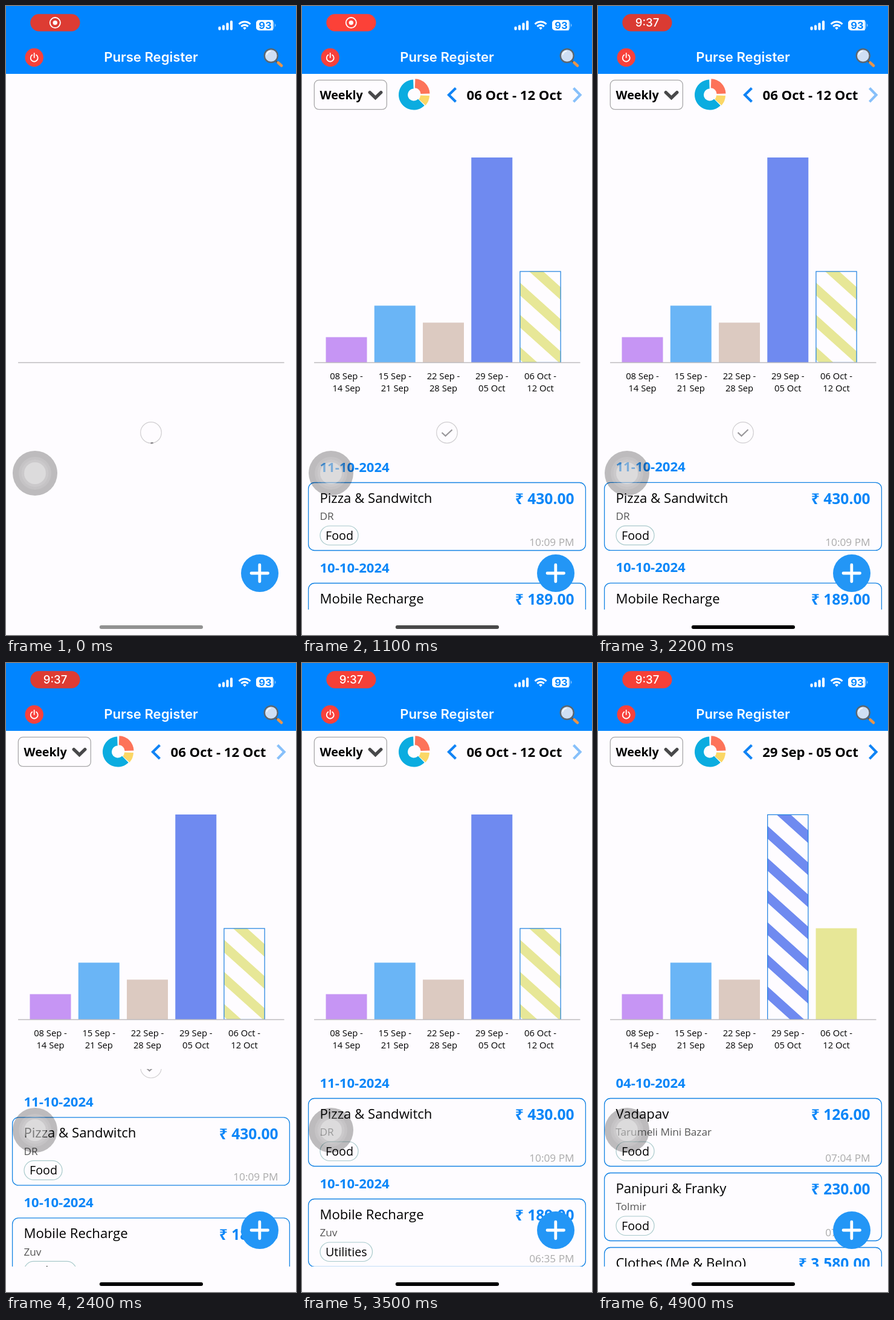
These frames come from a looping animation (480x1038 px, 5 s). An HTML page:

```html
<!DOCTYPE html>
<html lang="en">
<head>
<meta charset="utf-8">
<title>Expenses</title>
<style>
html, body { margin: 0; width: 100%; height: 100%; overflow: hidden; background: #fefcff; }
svg { display: block; width: 100%; height: 100%; }
text { font-family: "Open Sans", "Noto Sans", sans-serif; white-space: pre; }
.ui { font-family: Inter, Roboto, sans-serif; }
.bold { font-weight: 700; font-size: 22.15px; }
.date { fill: #0a86f8; }
.title { font-size: 22.15px; }
.sum { font-weight: 700; font-size: 24.6px; fill: #0a86f8; text-anchor: end; }
.note { font-size: 17.2px; fill: #555; }
.time { font-size: 17.2px; fill: #aaa; text-anchor: end; }
.tag { font-size: 19.7px; }
.label { font-size: 14.77px; text-anchor: middle; }
.line { fill: none; stroke-linecap: round; stroke-linejoin: round; }
.mid { text-anchor: middle; }
</style>
</head>
<body>
<svg viewBox="0 0 480 1038" preserveAspectRatio="none">
  <defs>
    <clipPath id="listClip"><path d="M0 670H480V996H0z"/></clipPath>
  </defs>
  <rect width="480" height="1038" fill="#fefcff"/>

  <!-- header -->
  <rect width="480" height="112" fill="#0185ff"/>
  <rect id="pill" x="40.3" y="13.2" width="82.2" height="28.6" rx="14.3"/>
  <g id="rec">
    <circle cx="81.3" cy="27.6" r="8.6" fill="none" stroke="#fff" stroke-width="1.8"/>
    <circle cx="81.3" cy="27.6" r="3.7" fill="#fff"/>
  </g>
  <text id="clock" class="ui mid" x="81.5" y="34.2" font-size="18.6" font-weight="500" fill="#fff">9:37</text>
  <path d="M353.5 38v-2.2M360 38v-4.6M366.5 38v-8.4M373 38v-12" stroke="#fff" stroke-width="4.2" stroke-linecap="round"/>
  <g class="line" stroke="#fff" stroke-width="3.1" style="stroke-linecap:butt">
    <path d="M385.6 30a13 13 0 0 1 18.8 0M389.3 33.8a8 8 0 0 1 11.4 0"/>
    <path d="M392.2 36.2a4 4 0 0 1 5.6 0L395 39.2z" fill="#fff" stroke="none"/>
  </g>
  <rect x="414" y="23.3" width="29.5" height="17" rx="5" fill="#8cc8ff"/>
  <path d="M419 23.3H441.5V40.3H419a5 5 0 0 1-5-5v-7a5 5 0 0 1 5-5z" fill="#fff"/>
  <path d="M445 29q3 2.8 0 5.6z" fill="#8cc8ff"/>
  <text class="ui mid" x="429" y="37.6" font-size="16.5" font-weight="700" fill="#0185ff">93</text>

  <circle cx="46.7" cy="85" r="15.2" fill="#f8413b"/>
  <path class="line" d="M43.3 80.8a6 6 0 1 0 6.8 0M46.7 78v7" stroke="#fff" stroke-width="1.8"/>
  <text class="ui mid" x="240" y="92.4" font-size="22.1" font-weight="600" fill="#fff">Purse Register</text>
  <path d="M446 90l5 5" stroke="#4c5963" stroke-width="3"/>
  <path class="line" d="M450.5 93.5l5.5 5" stroke="#e8954a" stroke-width="4.6"/>
  <circle cx="438.7" cy="82" r="11" fill="#cfdff4" stroke="#5b6670" stroke-width="2.4"/>
  <path class="line" d="M431.5 80a8 8 0 0 1 6-5.5" stroke="#f3f8ff" stroke-width="2"/>

  <!-- chart and list -->
  <g id="content">
    <rect x="20.3" y="122.4" width="120" height="48.3" rx="7.5" fill="none" stroke="#a9a8aa" stroke-width="1.3"/>
    <text x="29.5" y="154" font-size="19.7" font-weight="700">Weekly</text>
    <path d="M112.3 142.6l9.2 8.8 9.2-8.8" fill="none" stroke="#48484a" stroke-width="5.4" stroke-linecap="round"/>
    <g id="pie"></g>
    <g class="line" stroke="#1083f5" stroke-width="4.2" style="stroke-linecap:butt;stroke-linejoin:miter">
      <path d="M254.5 135.5l-11.5 11.3 11.5 11.3"/>
      <path id="next" d="M449.5 135.5l11 11.3-11 11.3"/>
    </g>
    <text id="range" class="bold mid" x="351.5" y="154.6"></text>
    <g id="week0"></g>
    <g id="week1"></g>
  </g>
  <path d="M20 588.5H460.5" stroke="#bdbbbe" stroke-width="1.4"/>

  <!-- refresh indicator -->
  <g clip-path="url(#listClip)">
    <g id="refresh">
      <circle cx="240" cy="704" r="17.3" fill="none" stroke="#d0ced1" stroke-width="1.2"/>
      <path id="arc" d="M238 686.9q2-.4 4 0" fill="none" stroke="#858387" stroke-width="2.4"/>
      <path id="check" d="M231.5 704l6 5.6 11-10.4" fill="none" stroke="#98969a" stroke-width="2.2"/>
    </g>
  </g>

  <circle cx="420" cy="936" r="31" fill="#2396f6"/>
  <path class="line" d="M406 936h27.5M419.8 922.2v27.6" stroke="#fff" stroke-width="4.8"/>
  <rect id="home" x="154.8" y="1022" width="171.2" height="6" rx="3"/>
  <circle cx="48" cy="771" r="37" fill="#000" fill-opacity=".26"/>
  <g fill="#fff">
    <circle cx="48" cy="771" r="27" fill-opacity=".12"/>
    <circle cx="48" cy="771" r="22.5" fill-opacity=".1"/>
    <circle cx="48" cy="771" r="18" fill-opacity=".32"/>
  </g>
</svg>
<script>
const $ = id => document.getElementById(id);

const bars = [
  ["08 Sep", "14 Sep", 546.5, "#c695f4"],
  ["15 Sep", "21 Sep", 494.5, "#6ab5f6"],
  ["22 Sep", "28 Sep", 522.5, "#dccac1"],
  ["29 Sep", "05 Oct", 250, "#6f8af0"],
  ["06 Oct", "12 Oct", 437.7, "#e7e797"]
];

// string entries are day headings, arrays are cards
const weeks = [
  { bar: 4, list: ["11-10-2024", ["Pizza & Sandwitch", "DR", "Food", "430.00", "10:09 PM"],
                   "10-10-2024", ["Mobile Recharge", "Zuv", "Utilities", "189.00", "06:35 PM"]] },
  { bar: 3, list: ["04-10-2024", ["Vadapav", "Tarumeli Mini Bazar", "Food", "126.00", "07:04 PM"],
                   ["Panipuri & Franky", "Tolmir", "Food", "230.00", "07:01 PM"],
                   ["Clothes (Me & Belno)", "Shop", "Shopping", "3,580.00", "05:20 PM"]] }
];
const tagWidth = { Food: 63, Utilities: 86.5, Shopping: 107 };

const text = (cls, x, y, s) =>
  `<text class="${cls}" x="${x}" y="${y}">${s.replace("&", "&amp;")}</text>`;

function stripes(x, top, color) {
  const height = 588 - top;
  let d = "";
  for (let y = -34.5; y < height; y += 53) d += `M0 ${y}l68 61v21l-68-61z`;
  return `<svg x="${x}" y="${top}" width="68" height="${height}"><path d="${d}" fill="${color}"/></svg>
    <rect x="${x + .4}" y="${top + .4}" width="67.2" height="${height}" fill="none" stroke="#1a7fe0" stroke-width="1.2"/>`;
}

function chart(selected) {
  return bars.map(([from, to, top, color], i) => {
    const x = 39.5 + i * 80.25, mid = x + 34;
    const shape = i === selected ? stripes(x, top, color)
      : `<rect x="${x}" y="${top}" width="68" height="${588 - top}" fill="${color}"/>`;
    return shape + text("label", mid, 616, from + " -") + text("label", mid, 636, to);
  }).join("");
}

function card(y, [title, note, tag, sum, time]) {
  return `<rect x="10.6" y="${y}" width="458.8" height="112" rx="10" fill="none" stroke="#1483e4" stroke-width="1.3"/>
    <rect x="30" y="${y + 71.5}" width="${tagWidth[tag]}" height="31.5" rx="15.7" fill="none" stroke="#a8c9cb" stroke-width="1.2"/>`
    + text("title", 29.4, y + 33.5, title) + text("sum", 450.5, y + 35.8, "₹ " + sum)
    + text("note", 29.4, y + 61.8, note) + text("tag", 39, y + 94.3, tag)
    + text("time", 450.5, y + 104.2, time);
}

function rows(list) {
  let y = 718.5, out = "";
  list.forEach((item, i) => {
    if (typeof item === "string") {
      if (i) y += 43;
      out += text("bold date", 29.4, y - 18, item);
    } else {
      out += card(y, item);
      y += 123;
    }
  });
  return out;
}

// ring segment; angles in degrees clockwise from the top
function segment(cx, cy, from, to, color) {
  const at = (a, r) => {
    const t = a * Math.PI / 180;
    return `${cx + r * Math.sin(t)} ${cy - r * Math.cos(t)}`;
  };
  const big = to - from > 180 ? 1 : 0;
  return `<path fill="${color}" d="M${at(from, 25)}A25 25 0 ${big} 1 ${at(to, 25)}L${at(to, 10)}A10 10 0 ${big} 0 ${at(from, 10)}z"/>`;
}

$("pie").innerHTML = segment(185, 146.5, 135, 358, "#0bace0")
  + segment(186.5, 145.3, 2, 88, "#fd7359") + segment(186, 147.2, 92, 132, "#fbd766");

weeks.forEach(({ bar, list }, i) => {
  $("week" + i).innerHTML = chart(bar)
    + `<g clip-path="url(#listClip)"><g class="scroll">${rows(list)}</g></g>`;
});
const scrolls = document.querySelectorAll(".scroll");

const clamp = v => Math.min(1, Math.max(0, v));
const ease = v => v * v * (3 - 2 * v);
const show = (id, on) => $(id).setAttribute("display", on ? "inline" : "none");
const move = (el, y) => el.setAttribute("transform", `translate(0 ${y})`);

function draw(t) {
  const loaded = t >= 1000, week = t >= 3750 ? 1 : 0;
  const pull = 68 * (1 - ease(clamp((t - 2190) / 400)));

  const glow = (1 - Math.cos((t - 200) / 1000 * Math.PI)) / 2;
  $("pill").setAttribute("fill", `rgb(${218 + 35 * glow},${59 + 6 * glow},${51 + 5 * glow})`);
  const swap = clamp((t - 1800) / 400);
  $("rec").setAttribute("opacity", 1 - swap);
  $("clock").setAttribute("opacity", swap);
  const gray = Math.max(0, 146 - t * .066);
  $("home").setAttribute("fill", `rgb(${gray},${gray},${gray})`);

  show("content", loaded);
  show("week0", !week);
  show("week1", week);
  const { bar } = weeks[week];
  $("range").textContent = `${bars[bar][0]} - ${bars[bar][1]}`;
  $("next").setAttribute("opacity", week ? 1 : .5);

  scrolls.forEach(el => move(el, pull));
  move($("refresh"), pull - 68);
  show("refresh", pull > 0);
  show("arc", !loaded);
  show("check", loaded);
  $("arc").setAttribute("transform", `rotate(${175 + t * .2525} 240 704)`);
}

const start = performance.now();
function tick() {
  // the picture advances ten times a second
  draw(Math.floor((performance.now() - start) % 5000 / 100) * 100);
  requestAnimationFrame(tick);
}
tick();
</script>
</body>
</html>
```
